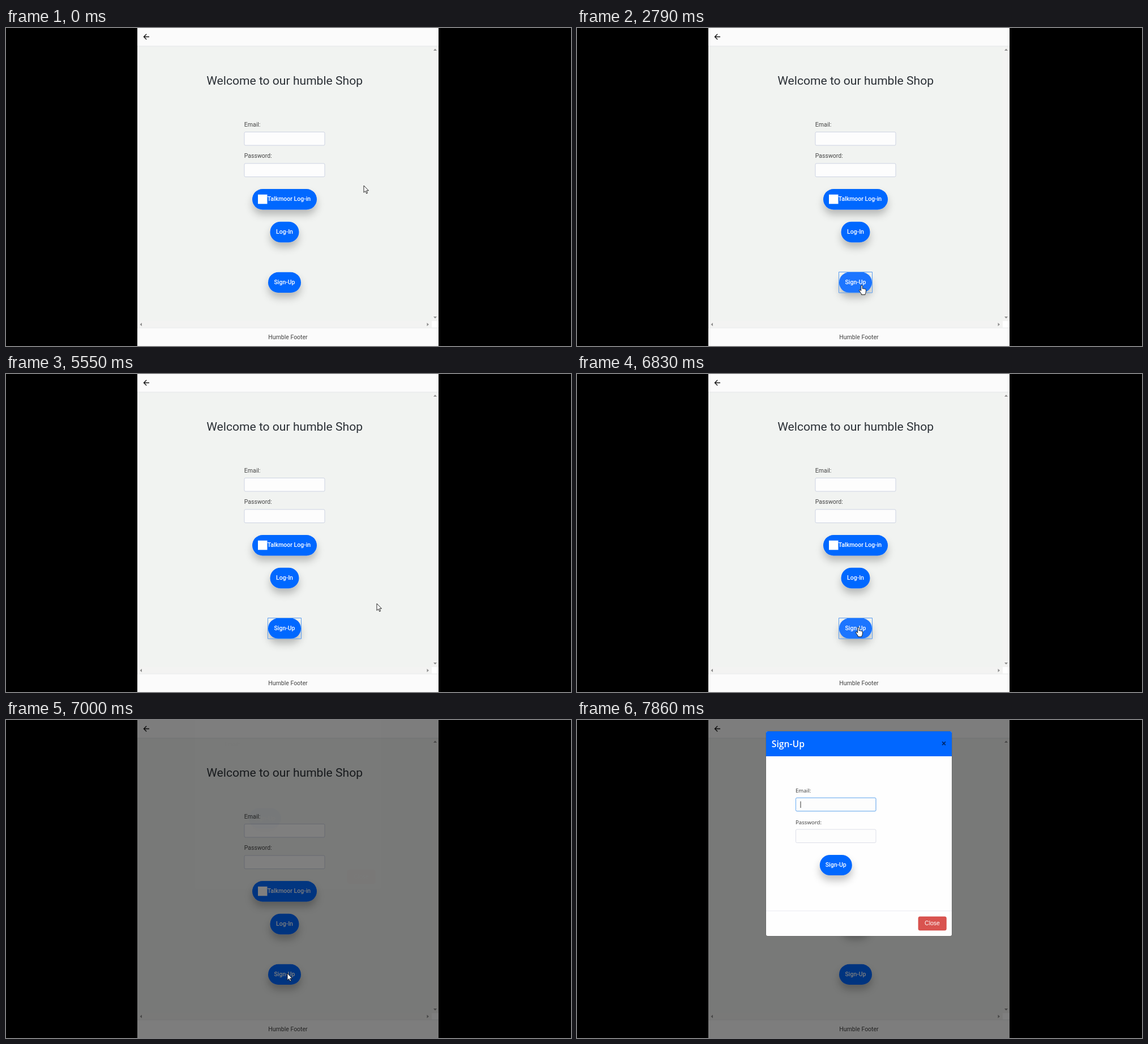
An HTML page for the animation above (8000 ms loop, 998 by 561 pixels).

```html
<!DOCTYPE html>
<html lang="en">
<head>
<meta charset="utf-8">
<title>Humble Shop</title>
<style>
html, body { margin: 0; width: 100%; height: 100%; overflow: hidden; background: #000; }
svg { display: block; width: 100%; height: 100%; }
text { font: 10.5px Roboto, sans-serif; fill: #444; }
.mid { text-anchor: middle; }
.title { font-size: 21.1px; fill: #2b3036; }
.btn rect { fill: #0167ff; }
.btn text { font-weight: 500; fill: #fff; text-anchor: middle; }
.btn.hover .pill { fill: #1a75ff; }
.field { fill: #fdfdfd; stroke: #cdd3e2; }
.bar { fill: #f3f3f2; }
.tick { fill: #8f8f8f; }
.modal .field { stroke: #dddfe8; }
.modal .label { font: 9.65px "Noto Sans", sans-serif; }
.modal .head { font: 600 15.7px "Open Sans", sans-serif; fill: #fff; }
.modal .x { font: 700 15.7px "Noto Sans", sans-serif; fill: #00286b; text-anchor: middle; }
.modal .close { font: 10.5px "Liberation Sans", Arial, sans-serif; fill: #fff; text-anchor: middle; }
.pointer { fill: #fff; stroke: #111; stroke-width: .9; stroke-linejoin: round; }
</style>
</head>
<body>
<svg viewBox="0 0 998 561" preserveAspectRatio="none">
  <defs>
    <filter id="lift" x="-60%" y="-60%" width="220%" height="260%">
      <feDropShadow dx="0" dy="9" stdDeviation="7" flood-color="#000" flood-opacity=".24"/>
    </filter>
    <clipPath id="panel"><path d="M232 0H764V561H232Z"/></clipPath>
  </defs>
  <rect width="998" height="561"/>
  <g clip-path="url(#panel)">
    <rect x="232" width="532" height="561" fill="#f1f3f1"/>

    <rect x="232" width="532" height="32" fill="#fbfbfb"/>
    <path d="M232 32H764" stroke="#e4e6e8"/>
    <path d="M253 15.5H243.5M248.2 10.7L243.4 15.5L248.2 20.3" fill="none" stroke="#111" stroke-width="1.3"/>

    <path class="bar" d="M752 33H764V517H752ZM232 517H752V529H232Z"/>
    <rect x="752" y="517" width="12" height="12" fill="#fff"/>
    <path class="tick" d="M755 40L758 36.5L761 40ZM755 509L758 512.5L761 509ZM240 520L236.5 523L240 526ZM743.5 520L747 523L743.5 526Z"/>
    <rect x="232" y="529" width="532" height="32" fill="#fbfbfb"/>
    <path d="M232 529H764" stroke="#e8eaea"/>
    <text class="mid" x="498" y="549">Humble Footer</text>

    <text class="title" x="354.2" y="100.4">Welcome to our humble Shop</text>
    <text x="420.8" y="173.6">Email:</text>
    <rect class="field" x="421" y="183.5" width="142" height="23.5" rx="2"/>
    <text x="420.8" y="229.3">Password:</text>
    <rect class="field" x="421" y="239" width="142" height="23.5" rx="2"/>

    <g class="btn">
      <rect x="435" y="284" width="114" height="36.5" rx="18.2" filter="url(#lift)"/>
      <path d="M445 293.8H461.5V310.3H445Z" fill="#fff"/>
      <text x="500" y="305.4">Talkmoor Log-in</text>
    </g>
    <g class="btn">
      <rect x="466.5" y="341.7" width="51" height="36.5" rx="18.2" filter="url(#lift)"/>
      <text x="492" y="363.4">Log-In</text>
    </g>
    <g class="btn" id="signUp">
      <rect class="pill" x="463" y="430.8" width="58" height="36.2" rx="18.1" filter="url(#lift)"/>
      <text x="492" y="452.4">Sign-Up</text>
      <path id="outline" d="M462.5 430.5H521.5V467H462.5Z" fill="none" stroke="#5b9df0"/>
    </g>

    <rect id="backdrop" x="232" width="532" height="561"/>

    <g class="modal" id="modal">
      <rect x="333.5" y="19.5" width="329" height="362" rx="3.5" fill="#000" fill-opacity=".2"/>
      <rect x="334" y="20" width="328" height="361" rx="3" fill="#fefefe"/>
      <path d="M334 64V23Q334 20 337 20H659Q662 20 662 23V64Z" fill="#0167ff"/>
      <text class="head" x="343.8" y="48.2">Sign-Up</text>
      <text class="x" x="648" y="47.4">×</text>
      <text class="label" x="386" y="128.2">Email:</text>
      <rect class="field" x="386.5" y="137.3" width="141.5" height="23.5" rx="2"/>
      <rect id="focusRing" x="386.5" y="137.3" width="141.5" height="23.5" rx="2" fill="none" stroke="#69aef5"/>
      <path id="caret" d="M395 143.5V155" stroke="#333"/>
      <text class="label" x="386" y="183.8">Password:</text>
      <rect class="field" x="386.5" y="193" width="141.5" height="23.5" rx="2"/>
      <g class="btn">
        <rect x="428.8" y="238" width="57" height="36" rx="18" filter="url(#lift)"/>
        <text x="457.2" y="259.4">Sign-Up</text>
      </g>
      <path d="M334 336.8H662" stroke="#ececf2"/>
      <rect x="603" y="347" width="49.3" height="24" rx="2.5" fill="#d9534f" stroke="#d2453f" stroke-width=".7"/>
      <text class="close" x="627.5" y="362.3">Close</text>
    </g>
  </g>

  <g class="pointer" id="pointer">
    <path id="arrow" d="M0 0V12.2L2.8 9.6L4.7 14L6.6 13.2L4.7 8.9H8.5Z"/>
    <path id="hand" d="M-1.3 1Q-1.3 -.2 0 -.2Q1.3 -.2 1.3 1V6Q2.2 5 3.4 6.2Q4.6 5.4 5.5 6.7Q7.2 6 7.4 7.8V11Q7.2 13.5 6 15V16.5H-.6V15Q-3 12 -4.6 9Q-4.6 7.4 -3 7.9L-1.3 9.6Z"/>
  </g>
</svg>
<script>
const LOOP = 8000;
const FIRST_CLICK = 2000, OPEN = 6850, FADE = 150, SLIDE = 300, FOCUS = 7700;
const TRAVEL = 83;
// Pointer stops: time, x, y
const stops = [
  [20, 632, 278], [810, 501, 440], [860, 501, 440], [960, 502, 442],
  [1290, 502, 442], [1560, 502, 446], [1990, 502, 446], [2790, 503, 454],
  [4180, 503, 454], [4600, 658, 409], [5520, 658, 409], [5550, 655, 405],
  [5680, 652, 402], [6090, 652, 402], [6780, 497, 447],
  [7270, 497, 447], [7430, 440, 149]
];
const el = id => document.getElementById(id);
const [signUp, outline, backdrop, modal, focusRing, caret, pointer, arrow, hand] =
  ["signUp", "outline", "backdrop", "modal", "focusRing", "caret", "pointer", "arrow", "hand"].map(el);
const clamp = v => Math.min(1, Math.max(0, v));
const ramp = (t, start, length) => clamp((t - start) / length);
const smooth = p => p * p * (3 - 2 * p);
const show = (node, on) => node.setAttribute("visibility", on ? "visible" : "hidden");

// cubic-bezier(0, 0, .58, 1)
function easeOut(p) {
  let lo = 0, hi = 1;
  for (let i = 0; i < 20; i++) {
    const s = (lo + hi) / 2;
    if (3 * (1 - s) * s * s * .58 + s ** 3 < p) lo = s; else hi = s;
  }
  return smooth(lo);
}

function pointerAt(t) {
  const i = stops.findIndex(s => s[0] > t);
  if (i === 0) return stops[0].slice(1);
  if (i < 0) return stops[stops.length - 1].slice(1);
  const [t0, x0, y0] = stops[i - 1], [t1, x1, y1] = stops[i];
  const p = smooth((t - t0) / (t1 - t0));
  return [x0 + (x1 - x0) * p, y0 + (y1 - y0) * p];
}

function draw(t) {
  const [x, y] = pointerAt(t);
  const hover = t < OPEN && x > 463 && x < 521 && y > 431 && y < 467;
  pointer.setAttribute("transform", `translate(${x} ${y})`);
  show(arrow, !hover && !(t > OPEN && y < 161));
  show(hand, hover);
  signUp.classList.toggle("hover", hover);
  show(outline, t >= FIRST_CLICK && t < OPEN);

  backdrop.setAttribute("opacity", .5 * ramp(t, OPEN, FADE));
  const start = OPEN + FADE;
  modal.setAttribute("opacity", ramp(t, start, FADE));
  modal.setAttribute("transform", `translate(0 ${-TRAVEL * (1 - easeOut(ramp(t, start, SLIDE)))})`);
  focusRing.setAttribute("opacity", smooth(ramp(t, FOCUS, FADE)));
  caret.setAttribute("opacity", t >= FOCUS ? 1 : 0);
}

const began = performance.now();
function tick() {
  draw((performance.now() - began) % LOOP);
  requestAnimationFrame(tick);
}
tick();
</script>
</body>
</html>
```
